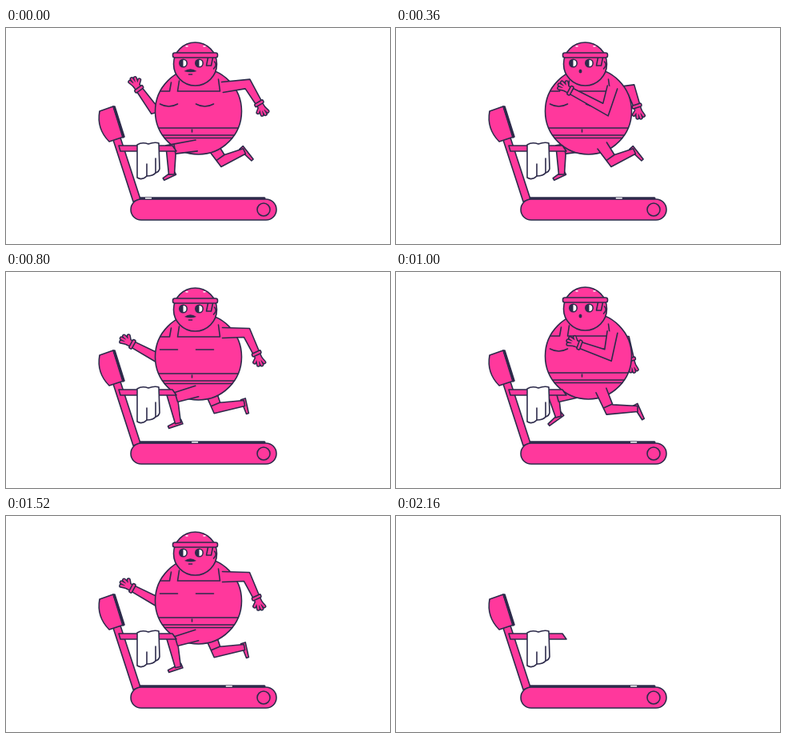
An HTML page with a canvas for the animation above (2240 ms loop, 480 px wide and 270 px high).

```html
<!DOCTYPE html>
<html lang="en">
<head>
<meta charset="utf-8">
<title>Treadmill</title>
<style>
html, body { margin: 0; width: 100%; height: 100%; overflow: hidden; background: #fff; }
canvas { display: block; }
</style>
</head>
<body>
<canvas id="stage" width="480" height="270"></canvas>
<script>
const g = document.getElementById('stage').getContext('2d');
const PINK = '#ff389c', INK = '#2d2b4b', WHITE = '#fff';
const LOOP = 2240, STEP = 40, STRIDE = 720, SLIP = 1680, GRIP = 1840, GONE = 2140;

// Rows start with a phase of the stride; the second leg runs half a stride later.
// phase, knee, ankle, toe
const LEG = [
  [0, 206, 152, 207, 183, 197, 189],
  [.111, 208, 158, 215, 189, 203, 194],
  [.222, 247, 172, 250, 207, 247, 212],
  [.278, 261, 180, 276, 207, 268, 211],
  [.389, 267, 172, 302, 171, 309, 184],
  [.5, 271, 166, 298, 154, 308, 165],
  [.611, 264, 170, 298, 164, 302, 177],
  [.722, 225, 172, 253, 185, 256, 195],
  [.778, 212, 171, 237, 195, 233, 207],
  [.889, 197, 158, 203, 181, 191, 191]
];
// phase, elbow, hand
const NEAR_ARM = [
  [0, 302, 70, 321, 102],
  [.111, 301, 76, 317, 110],
  [.222, 303, 96, 313, 132],
  [.278, 290, 105, 270, 128],
  [.389, 265, 104, 221, 88],
  [.5, 262, 102, 210, 74],
  [.611, 262, 106, 205, 90],
  [.7, 285, 102, 270, 125],
  [.778, 303, 84, 316, 120],
  [.889, 303, 75, 322, 108]
];
const FAR_ARM = [
  [0, 184, 101, 161, 69],
  [.111, 187, 106, 150, 86],
  [.222, 200, 122, 177, 132],
  [.278, 240, 120, 220, 130],
  [.389, 287, 86, 296, 118],
  [.5, 294, 77, 304, 106],
  [.611, 292, 86, 302, 118],
  [.7, 260, 115, 235, 130],
  [.778, 190, 117, 153, 104],
  [.889, 186, 108, 152, 84]
];
// phase of one step, drop, squash, chest sag
const BOUNCE = [[0, 0, 0, 3], [.222, 2, 0, 0], [.444, 11, 4, -2], [.556, 6.5, 0, 4], [.778, 1, 0, 3]];
const MOUTH = [[0, 8], [.222, 7], [.389, 2], [.6, 2], [.778, 6]];

const mix = (a, b, k) => a.map((v, i) => v + (b[i] - v) * k);

function sample(rows, phase) {
  const p = phase % 1;
  const i = rows.findLastIndex(r => r[0] <= p);
  const a = rows[i], b = rows[(i + 1) % rows.length];
  const end = b[0] > a[0] ? b[0] : 1;
  return mix(a, b, (p - a[0]) / (end - a[0])).slice(1);
}

function runPose(t) {
  const p = t / STRIDE;
  const [drop, squash, sag] = sample(BOUNCE, p * 2);
  return {
    body: [240.5, 104 + drop, 0, squash, sag, ...sample(MOUTH, p)],
    nearArm: sample(NEAR_ARM, p), farArm: sample(FAR_ARM, p),
    nearLeg: sample(LEG, p), farLeg: sample(LEG, p + .5)
  };
}

const FALL = {
  body: [282, 112, -.733, 0, 2, 2.5],
  nearArm: [268, 92, 247, 119], farArm: [234, 142, 208, 154],
  nearLeg: [345, 148, 368, 125, 379, 127], farLeg: [351, 129, 372, 108, 382, 118]
};

const shift = (list, dx) => list.map((v, i) => i % 2 ? v : v + dx);

function pose(t) {
  if (t <= SLIP) return runPose(t);
  if (t < GRIP) {
    const from = runPose(SLIP), k = ((t - SLIP) / (GRIP - SLIP)) ** 1.2, out = {};
    for (const part in from) out[part] = mix(from[part], FALL[part], k);
    return out;
  }
  // The gripping hand stays until the arm is fully stretched.
  const dx = 330 * ((t - GRIP) / 300) ** 1.6, hold = Math.max(0, dx - 45);
  const [ex, ey, hx, hy] = FALL.farArm;
  const [x, y, ...rest] = FALL.body;
  return {
    body: [x + dx, y, ...rest],
    nearArm: shift(FALL.nearArm, dx),
    farArm: [ex + (dx + hold) / 2, ey, hx + hold, hy],
    nearLeg: shift(FALL.nearLeg, dx), farLeg: shift(FALL.farLeg, dx)
  };
}

function paint(path, fill, width = 1.6) {
  if (fill) { g.fillStyle = fill; g.fill(path); }
  g.strokeStyle = INK;
  g.lineWidth = width;
  g.stroke(path);
}
const draw = (d, fill, width) => paint(new Path2D(d), fill, width);

function oval(x, y, rx, ry, fill) {
  const path = new Path2D();
  path.ellipse(x, y, rx, ry, 0, 0, 7);
  paint(path, fill);
}

function box(x, y, w, h, r, fill = PINK) {
  const path = new Path2D();
  path.roundRect(x, y, w, h, r);
  paint(path, fill);
}

// A tapering outline along the joints, open at the first one.
function limb(points, widths, closed) {
  const dirs = points.slice(1).map(([x, y], i) => Math.atan2(y - points[i][1], x - points[i][0]));
  const left = [], right = [];
  points.forEach(([x, y], i) => {
    const a = dirs[Math.max(0, i - 1)], b = dirs[Math.min(dirs.length - 1, i)];
    const half = Math.atan2(Math.sin(b - a), Math.cos(b - a)) / 2, n = a + half;
    const r = widths[i] / 2 / Math.max(.65, Math.cos(half));
    left.push([x + Math.sin(n) * r, y - Math.cos(n) * r]);
    right.unshift([x - Math.sin(n) * r, y + Math.cos(n) * r]);
  });
  draw('M' + left.concat(right).join('L') + (closed ? 'Z' : ''), PINK);
}

// A point fixed to the turning body.
function onBody([cx, cy, turn], x, y) {
  const c = Math.cos(turn), s = Math.sin(turn);
  return [cx + x * c - y * s, cy + x * s + y * c];
}

function hand(x, y, angle) {
  g.save();
  g.translate(x, y);
  g.rotate(angle);
  const palm = new Path2D('M1 0H5');
  const fingers = new Path2D('M5-2L12-4M5 0L13.5 0M5 2L12 4M3 2L7 7');
  for (const [color, edge] of [[INK, 3], [PINK, 0]]) {
    g.strokeStyle = color;
    g.lineWidth = 6.5 + edge;
    g.stroke(palm);
    g.lineWidth = 2.2 + edge;
    g.stroke(fingers);
  }
  box(-4, -6, 4, 12, 1.5);
  g.restore();
}

function arm(shoulder, [ex, ey, hx, hy]) {
  const a = Math.atan2(hy - ey, hx - ex);
  const wrist = [hx - 7 * Math.cos(a), hy - 7 * Math.sin(a)];
  limb([shoulder, [ex, ey], wrist], [13, 11, 8]);
  hand(...wrist, a);
}

function leg(body, [kx, ky, ax, ay, tx, ty]) {
  const hip = onBody(body, Math.min(20, 8 + .3 * (kx - body[0])), 43);
  const heel = [ax - .4 * (tx - ax), ay - .4 * (ty - ay)];
  limb([heel, [tx, ty]], [6, 3], true);
  limb([hip, [kx, ky], [ax, ay]], [14, 12, 7]);
  // shorts hem
  const a = Math.atan2(ky - hip[1], kx - hip[0]);
  const mx = kx - 5 * Math.cos(a), my = ky - 5 * Math.sin(a);
  const dx = 5.5 * Math.sin(a), dy = 5.5 * Math.cos(a);
  draw(`M${mx + dx} ${my - dy}L${mx - dx} ${my + dy}`);
}

function torso([x, y, turn, squash, sag]) {
  g.save();
  g.translate(x, y);
  g.rotate(turn);
  g.scale(1 + squash / 54, 1 - 1.7 * squash / 54);
  oval(0, 0, 54, 54, PINK);
  draw('M-34-36L-36-25H-47M-24-38L-26-25H27L25-40');
  for (const left of [-48, -3]) draw(`M${left}-9q11 ${2 * sag} 22 0`);
  for (const h of [21, 30, 33.5]) {
    const w = Math.sqrt(54 * 54 - h * h);
    draw(`M${-w} ${h}H${w}`);
  }
  draw('M-8 23v3');
  g.restore();
}

function head([x, y, turn, squash, , mouth]) {
  g.save();
  g.translate(x, y);
  g.rotate(turn);
  g.translate(-4, -59);
  g.scale(1 + squash / 54, 1 - squash / 108);
  oval(0, 0, 27, 27, PINK);
  g.fillStyle = WHITE;
  g.fillRect(-12, -23, 3, 1.5);
  g.fillRect(10, -23, 3, 1.5);
  draw('M16-8L14 2H20L22-8M24-3q4 4-1 9');
  box(-28, -14, 56, 6, 2.5);
  const calm = turn > -.4;
  for (const ex of [-15, 5]) {
    oval(ex, -1, 4.7, 4.7, WHITE);
    g.fillStyle = INK;
    g.beginPath();
    if (calm) g.arc(ex, -1, 4.7, Math.PI / 2, -Math.PI / 2);
    else g.arc(ex, -1, 1.4, 0, 7);
    g.fill();
  }
  g.fillStyle = INK;
  g.beginPath();
  if (mouth < 4) g.ellipse(-6, 9, mouth, 2.6, 0, 0, 7);
  else {
    g.moveTo(-6 - mouth, 9);
    g.quadraticCurveTo(-6, 3.5, -6 + mouth, 9);
    g.quadraticCurveTo(-6, 11.5, -6 - mouth, 9);
  }
  g.fill();
  if (mouth > 4) draw('M-8 13h4');
  g.restore();
}

function runner(t) {
  const p = pose(t), b = p.body;
  arm(onBody(b, 0, -19), p.farArm);
  leg(b, p.farLeg);
  torso(b);
  leg(b, p.nearLeg);
  head(b);
  arm(onBody(b, 30, -30), p.nearArm);
}

function machine(t) {
  draw('M134 140L143 137L168 214L159 217Z', PINK);
  draw('M117 104L134 98L147 136L129 142Q113 126 117 104Z', PINK);
  draw('M134 98L136 98L148 136L146 137Z', INK);
  box(156, 214, 182, 26, 13);
  oval(322, 227, 8, 8);
  draw('M168 212.7H323', null, 3);
  const k = t % 580, x = k > 520 ? 178 : Math.max(178, 169 + .305 * k);
  g.fillStyle = WHITE;
  g.fillRect(x - 4, 212, 8, 1.5);
}

function handle() {
  draw('M141 147H208L213 154H143Z', PINK);
  draw('M164 146Q170 142 178 145Q186 142 191 144L192 176Q191 180 187 181Q184 185 176 185Q170 191 164 187Z', WHITE);
  draw('M176 170V185M187 163V181');
}

function sweat() {
  g.fillStyle = PINK;
  g.fillRect(214, 29, 2.5, 2.5);
  g.fillRect(242, 26, 2, 2);
}

function frame(now) {
  const t = Math.min(2160, Math.floor(now % LOOP / STEP) * STEP);
  g.fillStyle = WHITE;
  g.fillRect(0, 0, 480, 270);
  g.lineJoin = g.lineCap = 'round';
  machine(t);
  if (t > SLIP) handle();
  if (t < GONE) runner(t);
  if (t <= SLIP) handle();
  if (t >= 1800 && t < 1880) sweat();
  requestAnimationFrame(frame);
}
frame(0);
</script>
</body>
</html>
```
